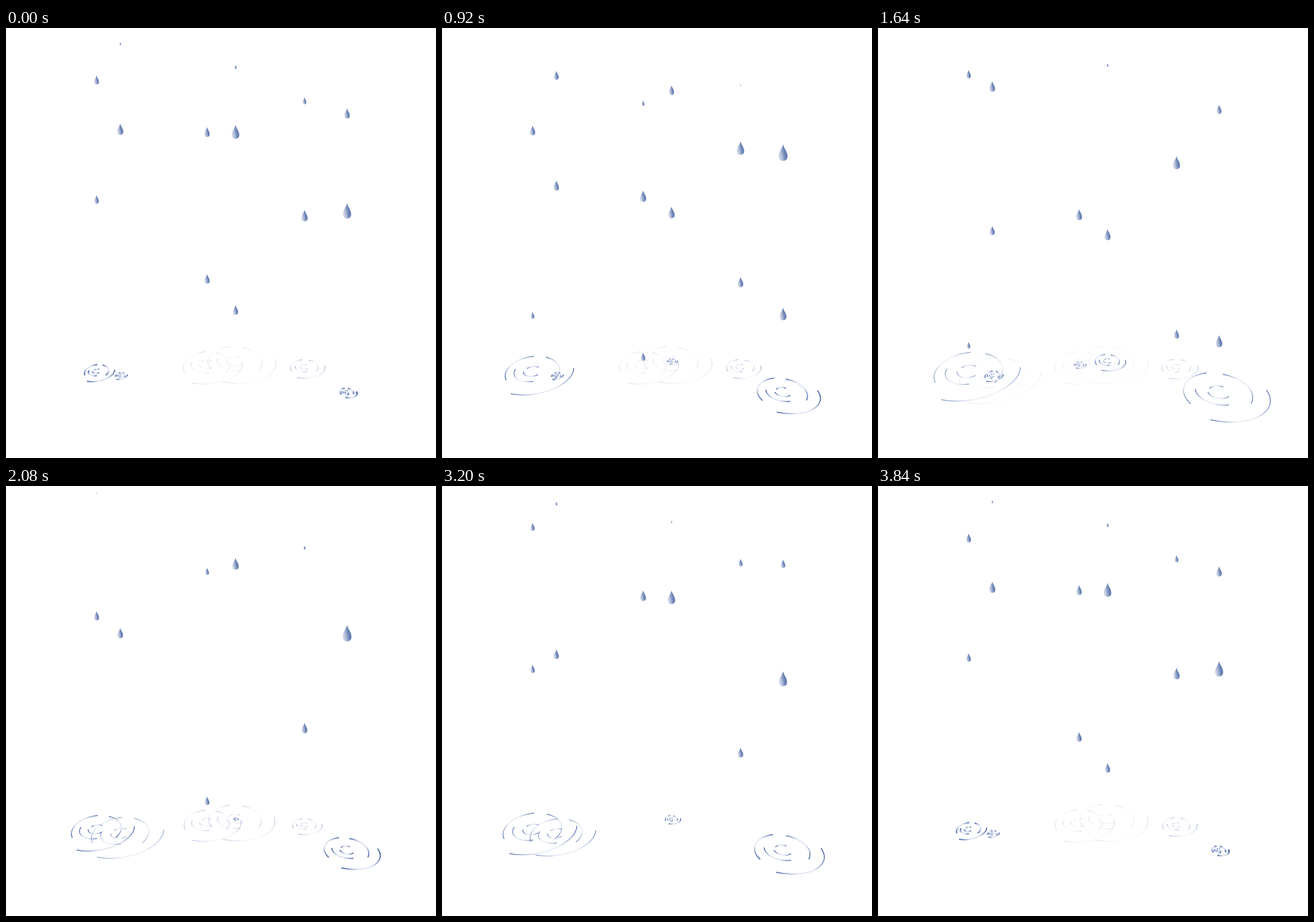
Write an HTML page with a canvas that moves like this. It is 748 by 748 pixels and loops after 3880 ms.

```html
<!DOCTYPE html>
<html lang="en">
<head>
<meta charset="utf-8">
<title>Rain</title>
<style>
  html, body { margin: 0; width: 100%; height: 100%; overflow: hidden; background: #fff; }
  canvas { display: block; width: 748px; height: 748px; }
</style>
</head>
<body>
<canvas id="stage" width="748" height="748"></canvas>
<script>
const ctx = document.getElementById('stage').getContext('2d');
const STEP = 40, LOOP = 3880, CYCLE = 96;
const STARTS = [0, 26, 49, 66, 80];   // drops of one column, in steps
const RAD = Math.PI / 180;

// top: release height, hit: water level, g: pull in px per step squared, size: tallest drop,
// delay/life/width/tilt: ripple start, duration, final width and slant
const columns = [
  { x: 157.6, top: 10, hit: 597, g: 0.328, phase: 0.35, size: 18.5, delay: 42.6, life: 20, width: 171, tilt: -10 },
  { x: 198.8, top: 19.5, hit: 604, g: 0.328, phase: 25.15, size: 21, delay: 43, life: 20, width: 145, tilt: -10 },
  { x: 349.8, top: 113, hit: 585, g: 0.328, phase: 15.6, size: 22, delay: 39.4, life: 16, width: 105, tilt: -4 },
  { x: 399.3, top: 58.7, hit: 579, g: 0.328, phase: 10.72, size: 24.7, delay: 40.4, life: 20, width: 120, tilt: 2 },
  { x: 519.3, top: 97.7, hit: 589.5, g: 0.328, phase: 20.6, size: 23.7, delay: 40.3, life: 12.5, width: 66.5, tilt: 0 },
  { x: 593.3, top: 109, hit: 633, g: 0.34, phase: 5.2, size: 30, delay: 39.8, life: 20, width: 190, tilt: 10 }
];

// Ripple arcs: centre y, rx, ry, from and to angle, for a ripple 152 px wide
const arcs = [
  [4, 61, 36, 154, 261],
  [3, 59, 34, -72, 29],
  [0, 41, 22, 77, 192],
  [0, 18, 10, 215, 305],
  [0, 20, 11, 42, 177],
  [4, 90, 46, -11, 111]
];

const clamp = v => Math.max(0, Math.min(1, v));

function addStops(gradient, stops) {
  for (const [at, color] of stops) gradient.addColorStop(at, color);
  return gradient;
}

const dropPath = new Path2D(
  'M0-.5C.05-.26.27-.04.27.2C.27.4.16.5 0 .5C-.16.5-.27.4-.27.2C-.27-.04-.05-.26 0-.5Z');
const dropFill = addStops(ctx.createLinearGradient(-0.27, 0.1, 0.27, 0),
  [[0, '#d9deec'], [0.35, '#aab7d5'], [0.6, '#758cbb'], [0.8, '#5f7ab0'], [1, '#8194c0']]);
const arcStops = [[0, '#5a75b4'], [0.35, '#dfe4f1'], [0.65, '#dfe4f1'], [1, '#5a75b4']];

function drawDrop(col, age) {
  const y = col.top + col.g * age * age;
  if (y > col.hit - 4) return;
  const h = col.size * (age < 18.3 ? age / 18.3 : 1 - 0.0175 * (age - 18.3));
  ctx.save();
  ctx.translate(col.x, y);
  ctx.scale(h, h);
  ctx.fillStyle = dropFill;
  ctx.fill(dropPath);
  ctx.restore();
}

function drawRipple(col, age) {
  const u = age / col.life;
  if (u <= 0 || u > 1.1) return;
  const k = col.width * Math.sin(Math.min(u, 1) * Math.PI / 2) / 152;
  const shift = -1.7 * col.tilt;
  ctx.save();
  ctx.translate(col.x, col.hit);
  ctx.rotate(col.tilt * RAD);
  ctx.globalAlpha = clamp((1.08 - u) / 0.35);
  ctx.lineWidth = Math.max(0.7, (0.25 + 3 * (1 - u)) * col.width / 190);
  for (const [cy, rx, ry, from, to] of arcs) {
    const a = (from + shift) * RAD, b = (to + shift) * RAD;
    const px = t => rx * k * Math.cos(t), py = t => (cy + ry * Math.sin(t)) * k;
    ctx.strokeStyle = addStops(ctx.createLinearGradient(px(a), py(a), px(b), py(b)), arcStops);
    ctx.beginPath();
    ctx.ellipse(0, cy * k, rx * k, ry * k, 0, a, b);
    ctx.stroke();
  }
  ctx.restore();
}

function draw(now) {
  const n = Math.floor(now % LOOP / STEP) % CYCLE;
  ctx.fillStyle = '#fff';
  ctx.fillRect(0, 0, 748, 748);
  for (const col of columns) {
    for (const start of STARTS) {
      const age = (n - start - col.phase + 2 * CYCLE) % CYCLE;
      drawDrop(col, age);
      drawRipple(col, age - col.delay);
    }
  }
}

const begin = performance.now();
function tick() {
  draw(performance.now() - begin);
  requestAnimationFrame(tick);
}
tick();
</script>
</body>
</html>
```
